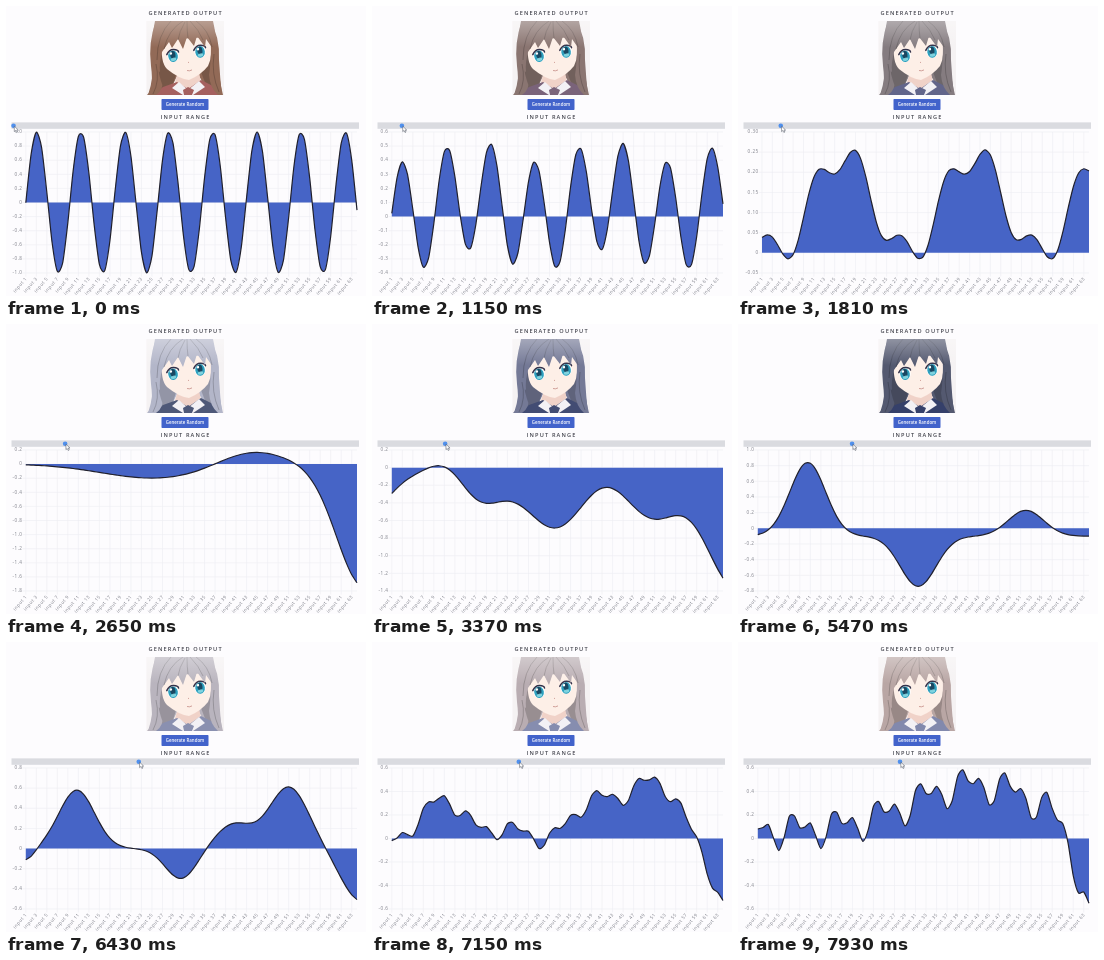
An HTML page with a canvas for the animation above (7.99 s loop, 360 by 290 pixels).

```html
<!DOCTYPE html>
<html lang="en">
<head>
<meta charset="utf-8">
<title>Generated output</title>
<style>
  html, body { margin: 0; width: 100%; height: 100%; overflow: hidden; background: #fdfcfe; }
  canvas, svg { position: absolute; left: 0; top: 0; width: 360px; height: 290px; }
  text { font-family: "Open Sans", sans-serif; text-anchor: middle; }
  .title { font-size: 5.6px; font-weight: 600; letter-spacing: 1.15px; fill: #44454e; }
  .hair { fill: var(--hair); }
  .shade { fill: var(--shade); }
  .strand { fill: none; stroke: var(--shade); stroke-width: .9; opacity: .6; }
  .cloth { fill: var(--cloth); }
  .lash { fill: none; stroke: #33324a; stroke-width: 1.5; stroke-linecap: round; }
</style>
</head>
<body>
<canvas id="chart"></canvas>
<svg viewBox="0 0 360 290">
  <defs>
    <clipPath id="frame"><rect x="140.5" y="15" width="77.5" height="74"/></clipPath>
    <linearGradient id="glow" x2="0" y2="1">
      <stop offset="0" stop-color="#fff" stop-opacity=".35"/>
      <stop offset=".35" stop-color="#fff" stop-opacity="0"/>
    </linearGradient>
    <g id="eye">
      <ellipse rx="5.8" ry="6" fill="#fff"/>
      <ellipse cy=".4" rx="4.8" ry="5.8" fill="#2ea0be"/>
      <ellipse cy="-1" rx="2.6" ry="3.8" fill="#1a4862"/>
      <ellipse cy="3.6" rx="2.8" ry="1.7" fill="#9be5ea" opacity=".75"/>
      <circle cx="-1.8" cy="-2.6" r="1.3" fill="#fff"/>
      <path class="lash" d="M-6 -2Q-3 -7 1.5 -6.2T6 -3"/>
    </g>
  </defs>

  <text class="title" x="179.6" y="8.6">GENERATED OUTPUT</text>
  <text class="title" x="179.6" y="112.6">INPUT RANGE</text>

  <g id="portrait" clip-path="url(#frame)">
    <rect x="140" y="15" width="79" height="75" fill="#f5f2f3"/>
    <path class="hair" d="M150 15Q142 36 145 60T141 89H162L171 70H193L204 89H216Q214 72 213 54Q214 30 204 15Z"/>
    <path class="shade" d="M155 47Q153 65 148 87L164 89 170 68ZM204 44Q207 64 211 84L203 87 195 66Z" opacity=".5"/>
    <path d="M172 66H193L196 82 181 86 168 80Z" fill="#f0d2c8"/>
    <path class="cloth" d="M146 89L157 81 171 76 182 83 195 74 209 81 215 89Z"/>
    <path d="M166 82L173 76 182 84 193 75 199 81 187 89H177Z" fill="#f3f1f5"/>
    <path class="cloth" d="M177 84L182 81 188 84 186 89H178Z"/>
    <path d="M156 34Q154 56 161 63Q173 73 183 74Q195 69 202 60Q208 48 203 31Z" fill="#fdefe7"/>
    <use href="#eye" transform="translate(167 49.8) rotate(-8)"/>
    <use href="#eye" transform="translate(194 45.5) rotate(-8)"/>
    <path d="M182 56l1 .8M181 64.5q2.5 .9 5 -.6" fill="none" stroke="#c58c86" stroke-width=".8"/>
    <path class="hair" d="M149 15H207Q211 30 207 43L200 33 199 41 191 30 188 40 181 31 177 43 172 33 166 42 163 36 156 46Q153 57 154 66Q146 62 147 45Q146 28 149 15Z"/>
    <path class="hair" d="M154 42Q150 62 155 75Q159 82 150 89H142Q148 72 148 47ZM205 38Q205 57 203 69Q204 82 212 89H217Q212 70 211 43Z"/>
    <path class="strand" d="M177 15Q162 24 158 43M179 16Q173 26 172 34M181 15Q181 25 182 32M184 15Q193 24 197 34M190 15Q203 24 206 41M165 15Q151 29 151 54M150 58Q154 75 147 88M208 48Q205 68 213 86"/>
    <rect x="140" y="15" width="79" height="75" fill="url(#glow)"/>
  </g>

  <rect x="155.5" y="93" width="47" height="11" rx=".8" fill="#4263cb"/>
  <text x="179" y="100.2" font-size="4.4" font-weight="600" fill="#fff">Generate Random</text>

  <rect x="5.5" y="116.4" width="347.5" height="6.4" fill="#dadbe0"/>
  <g id="handle">
    <circle cy="119.8" r="2.3" fill="#5090ed"/>
    <path d="M.8 120.2v5.4l1.3-1.1 1 2 1-.5-.9-1.9h1.7Z" fill="#fff" stroke="#444a58" stroke-width=".5"/>
  </g>
</svg>

<script>
const LOOP = 7990, STEP = 60, COUNT = 64;
const RIGHT = 351, TOP = 126, BOTTOM = 267;
const mix = (a, b, k) => a + (b - a) * k;

// Building blocks of every series, as functions of the input index.
const flat = level => () => level;
const wave = (size, period, peak) => i => size * Math.cos(2 * Math.PI * (i - peak) / period);
const bump = (size, center, width) => i => size * Math.exp(-(((i - center) / width) ** 2));

const rgb = hex => [1, 3, 5].map(i => parseInt(hex.slice(i, i + 2), 16));
function pose(time, hair, cloth, ...parts) {
  const values = Array.from({ length: COUNT }, (_, i) => parts.reduce((sum, part) => sum + part(i), 0));
  return { time, hair: rgb(hair), cloth: rgb(cloth), values };
}
const poses = [
  pose(0, "#926a57", "#a5605f", wave(1, 8.38, 2.1)),
  pose(1810, "#857c80", "#62658a", flat(.12), wave(.122, 25.3, 15.4), wave(.04, 8.43, 10.1)),
  pose(2650, "#b3b6c9", "#4e5878", bump(-.2, 24.4, 14.3), bump(.2, 42.8, 8.6), bump(-1.74, 64.3, 7.2)),
  pose(4150, "#30375f", "#34406e", flat(-.95), wave(.34, 17.9, 40.4), bump(1.19, 11.2, 5.7), bump(.34, 0, 5.7), bump(.2, 64, 4.2)),
  pose(5470, "#545970", "#35406a", flat(-.1), bump(.94, 9.5, 4.8), bump(-.64, 30.5, 4.8), bump(.33, 51, 4.8)),
  pose(6430, "#b9b4be", "#8a90b0", bump(-.12, 0, 2.3), bump(.58, 9.7, 4.8), bump(-.3, 29.5, 4.2),
    bump(.24, 39.6, 4.9), bump(.61, 50, 5.3), bump(-.52, 63.8, 5.3)),
  pose(7930, "#b9a6a4", "#8289ad", flat(.07), bump(.39, 41.5, 17), bump(-1.15, 66.2, 5.7), wave(.1, 8.06, 23.7), wave(.085, 4.03, 22.3)),
];

function niceCeil(n) {
  const power = 10 ** Math.floor(Math.log10(n));
  return power * [1, 2, 5, 10].find(f => n / power <= f + 1e-9);
}
function axesFor(values) {
  const low = Math.min(...values), high = Math.max(...values);
  const step = niceCeil(high - low) / 10;
  const digits = step < .1 ? 2 : 1;
  const first = Math.floor(low / step + 1e-6), last = Math.ceil(high / step - 1e-6);
  const left = 15.6 + 4.2 * digits;
  return {
    step, digits, first, last, left,
    x: i => mix(left, RIGHT, i / (COUNT - 1)),
    y: v => TOP + (last - v / step) * (BOTTOM - TOP) / (last - first),
  };
}

const canvas = document.getElementById("chart"), ctx = canvas.getContext("2d");
const ratio = window.devicePixelRatio || 1;
canvas.width = 360 * ratio;
canvas.height = 290 * ratio;
ctx.scale(ratio, ratio);
const portrait = document.getElementById("portrait"), handle = document.getElementById("handle");

function segment(x0, y0, x1, y1) {
  ctx.beginPath();
  ctx.moveTo(x0, y0);
  ctx.lineTo(x1, y1);
  ctx.stroke();
}

function drawAxes({ step, digits, first, last, left, x, y }) {
  ctx.strokeStyle = "#ecedf2";
  ctx.lineWidth = .6;
  ctx.fillStyle = "#7b7d87";
  ctx.font = '4.6px "Open Sans", sans-serif';
  ctx.textAlign = "right";
  ctx.textBaseline = "middle";
  ctx.letterSpacing = ".5px";
  for (let n = first; n <= last; n++) {
    const level = y(n * step);
    segment(left - 3.3, level, RIGHT, level);
    ctx.fillText(n ? (n * step).toFixed(digits) : "0", left - 3.3, level);
  }
  for (let i = 0; i < COUNT; i += 2) {
    segment(x(i), TOP, x(i), BOTTOM + 3.5);
    ctx.save();
    ctx.translate(x(i) + .5, BOTTOM + 5);
    ctx.rotate(-.87);
    ctx.fillText("input " + (i + 1), 0, 0);
    ctx.restore();
  }
}

function drawSeries(values, { left, x, y }) {
  const pts = values.map((v, i) => [x(i), y(v)]);
  const at = i => pts[Math.max(0, Math.min(COUNT - 1, i))];
  const line = new Path2D();
  line.moveTo(...pts[0]);
  for (let i = 1; i < COUNT; i++) {
    const [a, b, c, d] = [at(i - 2), at(i - 1), at(i), at(i + 1)], k = .12;
    line.bezierCurveTo(b[0] + (c[0] - a[0]) * k, b[1] + (c[1] - a[1]) * k,
                       c[0] - (d[0] - b[0]) * k, c[1] - (d[1] - b[1]) * k, ...c);
  }
  const area = new Path2D(line);
  area.lineTo(RIGHT, y(0));
  area.lineTo(left, y(0));
  ctx.fillStyle = "#4664c6";
  ctx.fill(area);
  ctx.strokeStyle = "#20202c";
  ctx.lineWidth = 1.2;
  ctx.lineJoin = "round";
  ctx.stroke(line);
}

function render(t) {
  t = Math.max(0, Math.floor((t - 10) / STEP) * STEP + 10);
  const next = Math.max(1, poses.findIndex(p => p.time > t));
  const b = t < poses.at(-1).time ? poses[next] : poses.at(-1);
  const a = poses[poses.indexOf(b) - 1];
  const k = (t - a.time) / (b.time - a.time);
  const blend = key => a[key].map((v, n) => mix(v, b[key][n], k));

  const values = blend("values"), axes = axesFor(values);
  ctx.clearRect(0, 0, 360, 290);
  drawAxes(axes);
  drawSeries(values, axes);

  const paint = (name, color) => portrait.style.setProperty("--" + name, `rgb(${color.map(Math.round)})`);
  const hair = blend("hair");
  paint("hair", hair);
  paint("shade", hair.map(c => c * .65));
  paint("cloth", blend("cloth"));
  handle.setAttribute("transform", `translate(${mix(7.5, 162, t / poses.at(-1).time)} 0)`);
}

const start = performance.now();
function tick() {
  render((performance.now() - start) % LOOP);
  requestAnimationFrame(tick);
}
tick();
</script>
</body>
</html>
```
